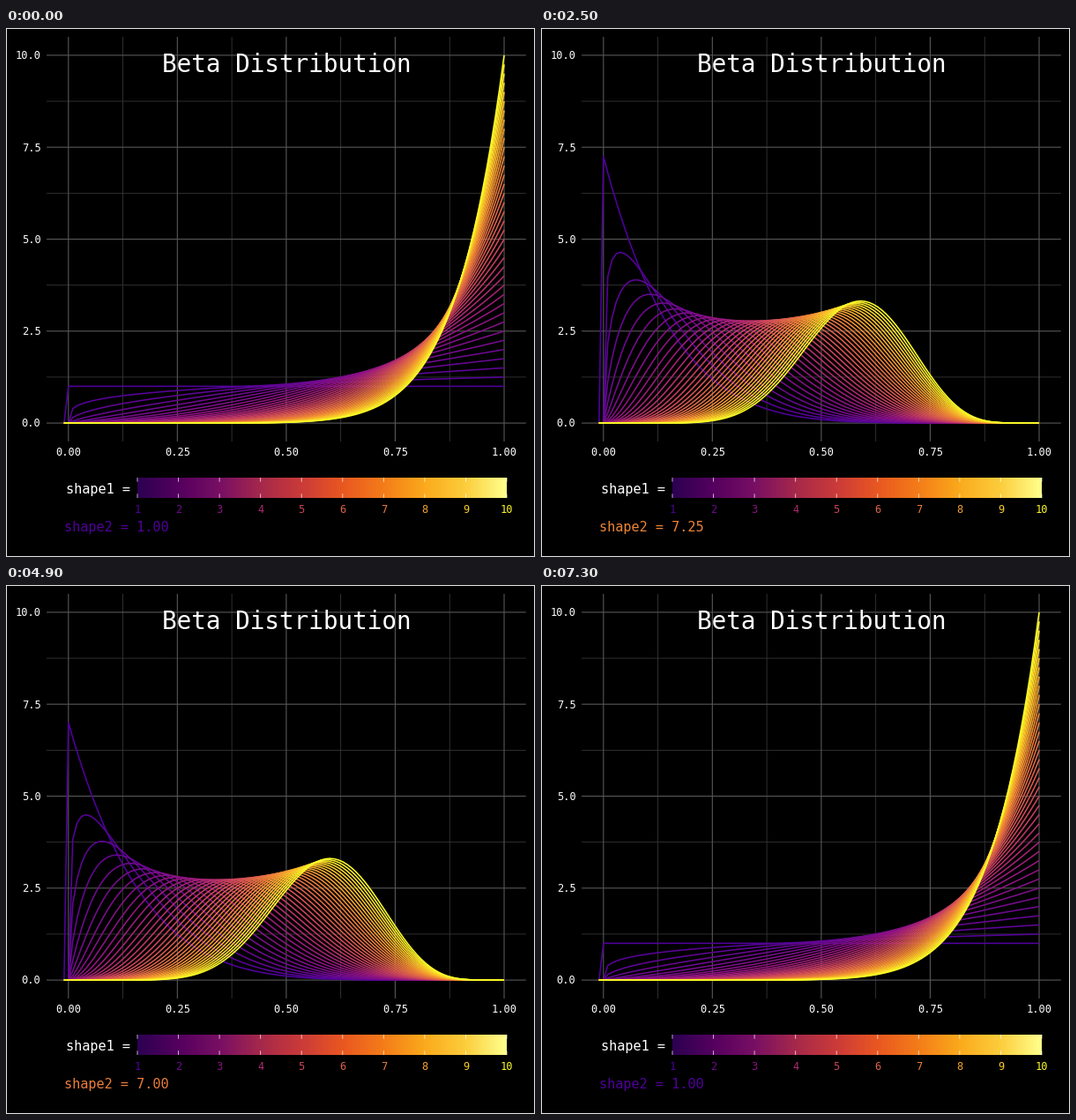
Animation, 600 px wide and 600 px high, one loop 7400 ms. Source, as a matplotlib script:

```python
import math

import matplotlib.pyplot as plt
import numpy as np
from matplotlib.animation import FuncAnimation
from matplotlib.collections import LineCollection
from matplotlib.colors import LinearSegmentedColormap
from matplotlib.patches import Rectangle

SIZE, DPI = 600, 100
PT = 72 / DPI
STEP = 0.25
SHAPES = np.arange(1, 10 + STEP, STEP)
LAST = len(SHAPES) - 1
FRAMES = 2 * len(SHAPES)

# Panel and colour bar geometry in pixels
X0, X_UNIT = 70.8, 494.2
Y0, Y_UNIT = 448.1, 41.72
BAR_L, BAR_R, BAR_T, BAR_B = 149, 568, 510, 533

LINE_MAP = LinearSegmentedColormap.from_list("lines", [
    (0, "#50009b"), (0.25, "#94157f"), (0.45, "#cd4659"),
    (0.7, "#f08735"), (0.88, "#fac828"), (1, "#fafa28")])
BAR_MAP = LinearSegmentedColormap.from_list("bar", [
    (0, "#2d0052"), (0.11, "#55005f"), (0.22, "#780f64"), (0.33, "#a5284b"),
    (0.45, "#cd3c37"), (0.56, "#e95820"), (0.67, "#f47d19"),
    (0.78, "#faaa1c"), (0.89, "#fccd3c"), (1, "#ffff8c")])

plt.rcParams["font.family"] = "DejaVu Sans Mono"


def px(x):
    return X0 + X_UNIT * x


def py(y):
    return Y0 - Y_UNIT * y


def shade(value):
    """Line colour for a shape value from 1 to 10."""
    return LINE_MAP((np.asarray(value) - 1) / 9)


xs = np.linspace(-0.01, 1, 102)
inside = np.clip(np.round(xs, 6), 0, 1)


def beta_pdf(a, b):
    scale = math.exp(math.lgamma(a + b) - math.lgamma(a) - math.lgamma(b))
    dens = scale * inside ** (a - 1) * (1 - inside) ** (b - 1)
    dens[0] = 0
    return dens


def curves(b):
    return [np.column_stack([px(xs), py(beta_pdf(a, b))]) for a in SHAPES]


fig = plt.figure(figsize=(SIZE / DPI, SIZE / DPI), dpi=DPI, facecolor="black")
ax = fig.add_axes([0, 0, 1, 1])
ax.axis("off")


def line(x, y, color, width, z=1):
    ax.plot(x, y, color=color, lw=width * PT, zorder=z, snap=False,
            solid_capstyle="butt")


def label(x, y, text, size, color="white", ha="center"):
    return ax.text(x, y, text, fontsize=size * PT, color=color, ha=ha,
                   va="baseline", zorder=5)


def grid(x_values, y_values, color, width):
    for x in x_values:
        line([px(x)] * 2, [py(-0.5), py(10.5)], color, width)
    for y in y_values:
        line([px(-0.05), px(1.05)], [py(y)] * 2, color, width)


x_major = np.arange(5) / 4
y_major = np.arange(5) * 2.5
grid(x_major[:-1] + 0.125, y_major[:-1] + 1.25, "#3a3a3a", 0.8)
grid(x_major, y_major, "#555555", 1.15)

for x, y in zip(x_major, y_major):
    label(px(x), 485, f"{x:.2f}", 12)
    label(39.5, py(y) + 4.4, f"{y:.1f}", 12, ha="right")

label(318, 50, "Beta Distribution", 27.6)
label(67.5, 528, "shape1 =", 15.3, ha="left")
counter = label(66, 570.5, "", 15.3, ha="left")

# Colour bar with ticks at both edges
ax.imshow(np.linspace(0, 1, 420)[np.newaxis], cmap=BAR_MAP, aspect="auto",
          extent=(BAR_L, BAR_R, BAR_B, BAR_T), interpolation="nearest",
          zorder=2)
for n in range(1, 11):
    x = BAR_L + (BAR_R - BAR_L) * (n - 1) / 9
    line([x, x], [BAR_T, BAR_T + 4.7], "#ffffffc0", 0.9, 3)
    line([x, x], [BAR_B - 4.7, BAR_B], "#ffffffc0", 0.9, 3)
    label(x, 550, str(n), 12, shade(n))

fan = LineCollection(curves(1), colors=shade(SHAPES), linewidths=1.6 * PT,
                     zorder=4, capstyle="butt", joinstyle="round")
ax.add_collection(fan)
ax.add_patch(Rectangle((0, 0), SIZE, SIZE, fill=False, ec="#e6e6e6",
                       lw=2 * PT, snap=False, zorder=6))
ax.set_xlim(0, SIZE)
ax.set_ylim(SIZE, 0)


def update(i):
    b = SHAPES[i if i <= LAST else FRAMES - 1 - i]
    fan.set_segments(curves(b))
    counter.set_text(f"shape2 = {b:.2f}")
    counter.set_color(shade(b))
    return fan, counter


anim = FuncAnimation(fig, update, frames=FRAMES, interval=100, repeat=True,
                     repeat_delay=0, init_func=lambda: update(0))
plt.show()
```
